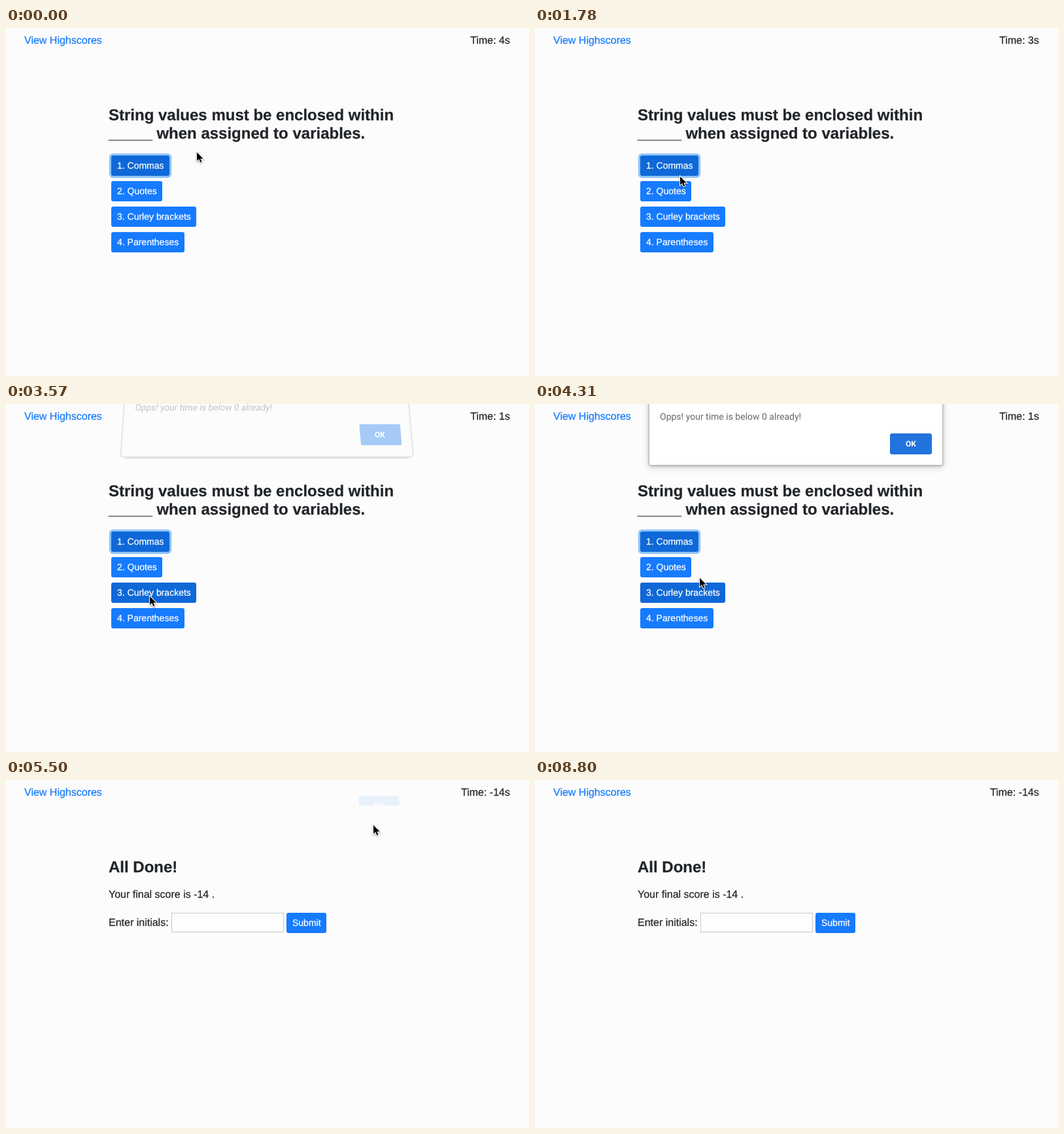
Write an HTML page that moves like this. It is 800 px wide and 532 px high and loops after 9400 ms.

```html
<!DOCTYPE html>
<html lang="en">
<head>
<meta charset="utf-8">
<title>Quiz</title>
<style>
  html, body { margin: 0; width: 100%; height: 100%; overflow: hidden; background: #fcfcfc; }
  svg { display: block; }
  text {
    font: 16px "Liberation Sans", Arial, sans-serif; text-rendering: geometricPrecision;
    color: #212529; fill: currentColor; stroke: currentColor; stroke-width: .25px;
  }
  .title { font-size: 24px; font-weight: bold; }
  .link { color: #167bff; }
  .button rect { fill: #167bff; }
  .button text { font-size: 14px; color: #fff; }
  .button.dark rect { fill: #0f68d7; }
  .button.focus rect { stroke: #8ec4fb; stroke-width: 6.4px; paint-order: stroke; }
  .message { font: 14px Roboto, sans-serif; color: #666; stroke: none; }
  .ok { font: bold 12px Roboto, sans-serif; color: #fff; stroke: none; }
  #alert > rect:first-child { filter: drop-shadow(0 1px 2px #0004) drop-shadow(0 3px 6px #0002); }
  #arrow { stroke: #fff; stroke-width: 2px; paint-order: stroke; filter: drop-shadow(0 1px 1px #0006); }
  #hand { fill: #fff; stroke: #000; filter: drop-shadow(0 1px 1px #0004); }
</style>
</head>
<body>
<svg width="800" height="532" viewBox="0 0 800 532">
  <text class="link" x="28" y="24">View Highscores</text>
  <text id="timer" x="771" y="24" text-anchor="end"></text>

  <g id="question">
    <text class="title" x="157" y="141">String values must be enclosed within</text>
    <text class="title" x="157" y="169">_____ when assigned to variables.</text>
  </g>

  <g id="result">
    <text class="title" x="157" y="141">All Done!</text>
    <text x="157" y="180">Your final score is -14 .</text>
    <text x="157" y="223">Enter initials:</text>
    <rect x="253.5" y="203.5" width="171" height="29" fill="#fdfdfd" stroke="#c8c8c8"/>
  </g>

  <g id="opening">
    <path d="M180 0L174 80L184 84H614L624 80L617 0Z" fill="#e5e5e6"/>
    <path d="M182 0L176 80H622L615 0Z" fill="#fcfcfc"/>
    <text class="message" transform="translate(197 10) skewX(-9) scale(.97)" style="color:#c2c2c5">Opps! your time is below 0 already!</text>
    <path d="M542 31H602Q603 31 603 33L605 61Q605 63 603 63H545Q543 63 543 61L540.5 33Q540.5 31 542 31Z" fill="#a5caf6"/>
    <text class="ok" x="572" y="51" text-anchor="middle">OK</text>
  </g>

  <g id="alert">
    <rect x="174.5" y="-10" width="449" height="103.5" rx="2" fill="#fff" stroke="#bbb"/>
    <text class="message" x="191" y="24">Opps! your time is below 0 already!</text>
    <rect x="543" y="45" width="64" height="32" rx="3" fill="#2273dd"/>
    <text class="ok" x="575" y="65" text-anchor="middle">OK</text>
  </g>

  <svg id="closing" width="800" height="39">
    <path d="M541 24H599Q600.5 24 601 26L602 40H540V26Q540 24 541 24Z" fill="#e8f1fa"/>
    <text class="ok" x="571" y="44" text-anchor="middle">OK</text>
  </svg>

  <g id="cursor">
    <path id="arrow" d="M1 1V14.2L4.1 11.3L6.4 16.5L8.4 15.6L6.3 10.7H10.7Z"/>
    <path id="hand" d="M4.4 10L2.7 3a1.4 1.4 0 0 1 2.7 -.8L6.8 7a1.3 1.3 0 0 1 2.6 -.2a1.3 1.3 0 0 1 2.5 .5a1.2 1.2 0 0 1 2.3 .7V12l-1.4 5.5H6.2L1.2 11.8a1.4 1.4 0 0 1 2 -2ZM7.6 11.5v3M9.6 11.5v3M11.6 11.5v3"/>
  </g>
</svg>
<script>
const LOOP = 9400, STEP = 146;
const $ = id => document.getElementById(id);
const show = (id, on) => { $(id).style.display = on ? "" : "none"; };

// Adds a button whose width follows its label.
function addButton(parent, id, x, y, label) {
  $(parent).insertAdjacentHTML("beforeend", `<g class="button" id="${id}">
    <rect x="${x}" y="${y}" height="31" rx="3"/>
    <text x="${x + 9}" y="${y + 20}">${label}</text></g>`);
  const [box, text] = $(id).children;
  box.setAttribute("width", Math.round(text.getComputedTextLength() + 17.6));
}
["Commas", "Quotes", "Curley brackets", "Parentheses"].forEach((name, i) =>
  addButton("question", "answer" + (i + 1), 161, 195 + 39 * i, `${i + 1}. ${name}`));
addButton("result", "submit", 429, 203, "Submit");
$("answer1").classList.add("focus", "dark");

const easeIn = p => p ** 3;
const easeOut = p => 1 - (1 - p) ** 2;
const easeInOut = p => p * p * (3 - 2 * p);

const START = { x: 291, y: 189 };
const moves = [
  { at: 750, steps: 4, x: 222, y: 212, ease: easeInOut },   // towards the answers
  { at: 1780, steps: 4, x: 218, y: 301, ease: easeInOut },  // down to answer 3
  { at: 2380, steps: 2, x: 219, y: 293, ease: easeOut },
  { at: 4310, steps: 2, x: 477, y: 70, ease: easeIn },      // up to the alert
  { at: 4610, steps: 4, x: 561, y: 68, ease: easeOut },     // onto OK
  { at: 8200, steps: 2, x: 281, y: 268, ease: easeOut },
  { at: 8650, steps: 1, x: 684, y: 403, ease: easeOut }     // leaving the stage
];

// The pointer advances in discrete steps along each move.
function pointerAt(t) {
  let { x, y } = START;
  for (const move of moves.filter(m => t >= m.at)) {
    const done = Math.floor((t - move.at) / STEP) + 1;
    const k = move.ease(Math.min(1, done / move.steps));
    x += (move.x - x) * k;
    y += (move.y - y) * k;
  }
  return [Math.round(x), Math.round(y)];
}

function secondsAt(t) {
  return t < 5500 ? 4 - [1040, 1930, 2970].filter(tick => t >= tick).length : -14;
}

function draw() {
  const t = performance.now() % LOOP;
  const between = (from, to) => t >= from && t < to;

  $("timer").textContent = `Time: ${secondsAt(t)}s`;
  show("question", t < 5500);
  show("result", t >= 5500);
  show("opening", between(3570, 3720));
  show("alert", between(3720, 5500));
  show("closing", between(5500, 8200));
  $("answer2").classList.toggle("dark", between(1930, 2080));
  $("answer3").classList.toggle("dark", between(2230, 5500));

  const pointing = between(1930, 3570);
  $("cursor").setAttribute("transform", `translate(${pointerAt(t)})`);
  show("cursor", t < 8800);
  show("hand", pointing);
  show("arrow", !pointing);
  requestAnimationFrame(draw);
}
draw();
</script>
</body>
</html>
```
